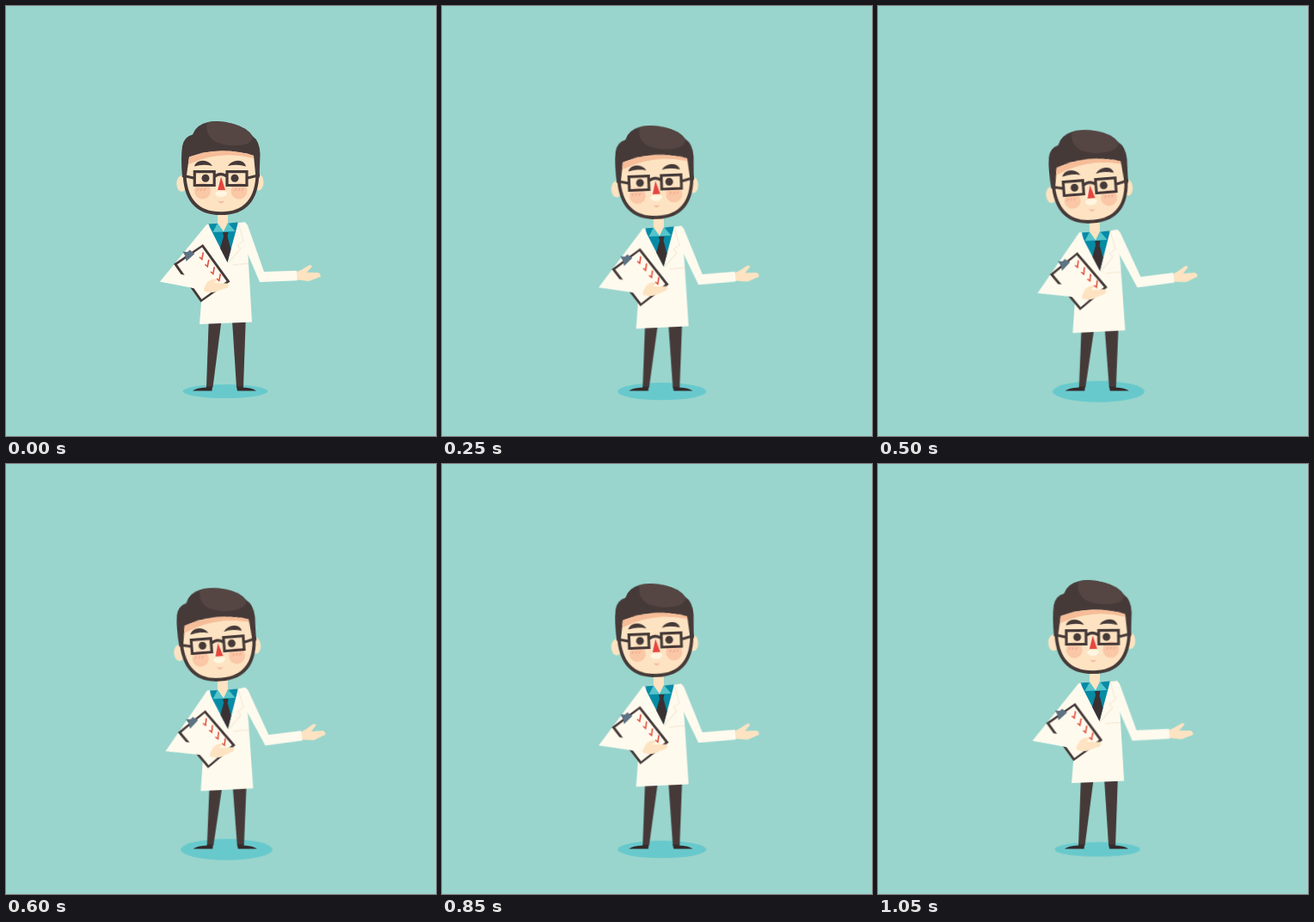
An HTML page that plays this animation: 500 px wide and 500 px high, repeating every 1100 ms.

```html
<!DOCTYPE html>
<html lang="en">
<head>
<meta charset="utf-8">
<title>Doctor with clipboard</title>
<style>
  html, body { margin: 0; width: 100%; height: 100%; overflow: hidden; background: #99d5cd; }
  svg { display: block; width: 100%; height: 100%; }

  /* Every part sinks to its low pose and back, in 50 ms steps. */
  .move { animation: bob 1100ms steps(11, end) infinite; }
  @keyframes bob {
    0%, 100% { transform: none; }
    50% { transform: var(--low); }
  }
  #shadow { transform-origin: 255px 448px; --low: translate(1.6px, .3px) scale(1.09, 1.6); }
  #legs { transform-origin: 255px 443px; --low: translate(.8px, 0) scale(1, .853); }
  #feet { --low: translate(.8px, 0); }
  #body { transform-origin: 255px 255px; --low: translate(0, 11px) rotate(-.8deg); }
  #arm { transform-origin: 295px 321px; --low: translate(7.2px, 7px) rotate(-5.9deg); }
  #board { transform-origin: 228px 312px; --low: translate(6.3px, 10.2px) rotate(-5.3deg); }
  #head { transform-origin: 250px 245px; --low: translate(0, 10.4px) rotate(-5deg); }

  .dark { fill: #463a39; }
  .shoe { fill: #342a2b; }
  .coat { fill: #fffaee; }
  .skin { fill: #fde3c1; }
  .line { fill: none; stroke: #463a39; }
  .fold { fill: none; stroke: #f7ecd9; stroke-width: 1.3; }
</style>
</head>
<body>
<svg viewBox="0 0 500 500">
  <ellipse id="shadow" class="move" cx="255" cy="448" rx="49.3" ry="8" fill="#68c9cc"/>

  <g id="legs" class="move dark">
    <path d="M236 358H251.500L240.500 443.500H233Z"/>
    <path d="M262.500 358H279L276 443.500H268Z"/>
  </g>
  <g id="feet" class="move shoe">
    <path d="M217 447.500Q221 444 233 443.500L233 442.500H240L239.500 447.500Z"/>
    <path d="M268 442.500H275.500V443.500Q287 444 291 447.500H269Z"/>
  </g>

  <g id="arm" class="move">
    <path class="skin" d="M336 310L343 307L353 301.300Q356 301 355.500 303.500L349.500 309.800L363 310Q366.500 311.500 365.500 315L352 320L336 318Z"/>
    <path class="coat" d="M266 253L278 251.500L281 255L300 309L338 307.800L338.500 319.300L295 321L278 281Z"/>
  </g>

  <g id="body" class="move">
    <path class="coat" d="M233.500 254L246 252L270 252L278.500 251.500L281.500 290L286 367.500L225 370L229 320Z"/>
    <path fill="#068ba6" d="M235 253.500L246 252.500H258L270 251.500L257.500 298Z"/>
    <path class="skin" d="M246 238H258V253L253 263L246 253Z"/>
    <path fill="#55c5cb" d="M246 252.500L253 262.500L240.500 263ZM258 252L266.500 262L253 262.500Z"/>
    <path fill="#3b3031" d="M252 263H258.500L257.500 268L261.500 283L257.500 298L249 281.500L253 268Z"/>
    <path class="fold" d="M270 252L276 273L269 278L273 282L258 299M235 254L232 276L237 279M264 301L282 299.500"/>
  </g>

  <g id="board" class="move">
    <path class="coat" d="M236 254L233 254.500L179 320.500L228 328L241 290Z"/>
    <path class="dark" d="M229 277L195 300L226.500 344.500L260.500 320.500Z"/>
    <path class="coat" d="M228 280.500L199 300.500L227.500 341L256.500 320Z"/>
    <path class="coat" d="M179 320.500L203 312L236 317L231 331L215 327.500Z"/>
    <path fill="#5d7283" d="M205.500 285.500L211 286L214 283.500L216.500 286L219.500 288L209.500 297L208.500 291Z"/>
    <path fill="none" stroke="#e2513f" stroke-width="1.600" d="M225 292l2.800 2.500l1.500-8M231.500 300.500l2.800 2.500l1.500-8M238 309l2.800 2.500l1.500-8M245 317l2.800 2.500l1.500-8"/>
    <path class="skin" d="M230 328L234.500 320.500Q240 316.500 245 317.500Q246 319 241.500 322L257 322.500Q260 324 257.500 327.500L243 332.500Q235 334 230 331Z"/>
  </g>

  <g id="head" class="move">
    <ellipse class="skin" cx="204.500" cy="206.500" rx="6.200" ry="9.500"/>
    <ellipse class="skin" cx="293.500" cy="205" rx="6" ry="9.500"/>
    <path class="dark" d="M205 199Q203 177 205 163Q207 152 217 149.500Q221 138 235 135Q249 132.500 264 137Q280 141 287 151.500Q295 157 295.500 172L294.500 200H289L287 185H214L210 200Z"/>
    <path fill="#554643" d="M234 135.300Q231 149 242 157Q258 165 278 161Q285 159 287 153Q281 142 264 137Q248 132.700 234 135.300Z"/>
    <path class="skin" d="M213 175.500Q232 168.500 251 168.500Q272 168.500 288 174L290.500 200Q290 241 250 241Q211 240 209.500 200Z"/>
    <path fill="#f6bd98" d="M213 175.500Q232 168.500 251 168.500Q272 168.500 288 174V177Q250 167 212 184Z"/>
    <path class="line" stroke-width="3.800" d="M207.500 192C207.500 225 222 241.200 250 241.200S292.500 225 292.500 192"/>

    <g fill="#fac7a7">
      <circle cx="228.500" cy="215" r="9.500"/>
      <circle cx="271" cy="215" r="9.500"/>
    </g>
    <path fill="none" stroke="#ee9f84" d="M222 215l2-3M226 215l2-3M230 215l2-3M266 215l2-3M270 215l2-3M274 215l2-3"/>

    <path class="dark" d="M219 186.500Q221 180 229 179.800Q236 180 240 186Q229 183.500 219 186.500ZM258 186Q262 180 270 179.800Q277 180 279 186.500Q269 183.500 258 186Z"/>
    <circle class="dark" cx="232" cy="200.300" r="4.500"/>
    <circle class="dark" cx="266" cy="200.300" r="4.500"/>
    <path fill="#fff8e9" d="M249.500 197L244.500 214H249Z"/>
    <path fill="#e5463f" d="M250 198.500L255 214H246Z"/>
    <path fill="#fff6e2" d="M243 218Q245 214.500 250 215.500Q256 214.500 257.500 217.500Q255 222 250 222Q245 222 243 218Z"/>
    <path fill="#f5b9a0" d="M246.500 226.500Q250 228 254 226.500Q250.500 232.500 246.500 226.500Z"/>
    <path class="line" stroke-width="3.200" d="M219.300 192.700H242.200V208.500H219.300ZM257 192.700H280V208.500H257ZM243 198Q249.500 193 256.500 198M205 197L218 200M281 200L295 196.500"/>
  </g>
</svg>
</body>
</html>
```
